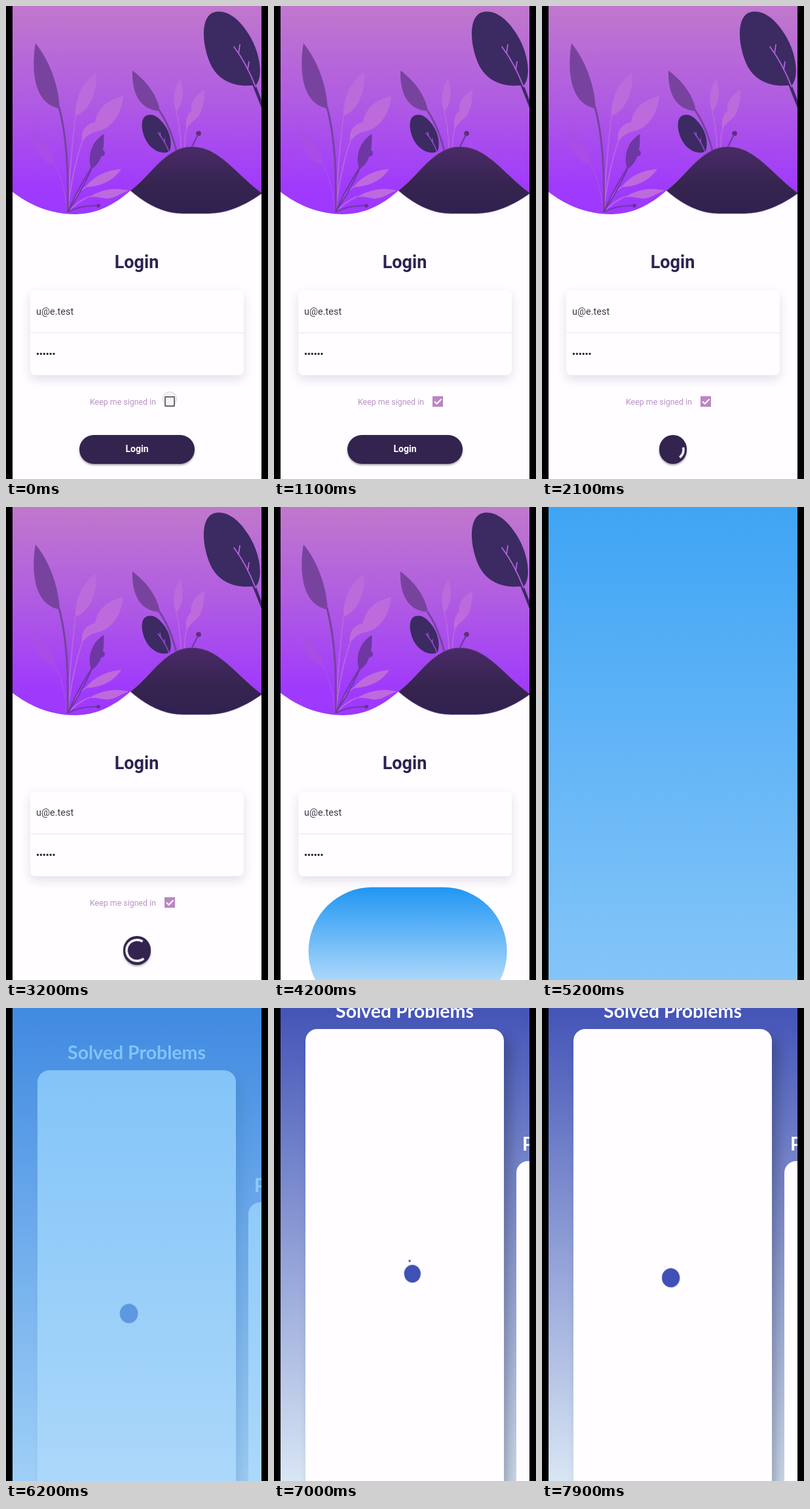
Write an HTML page that moves like this. It is 400x720 px and loops after 8000 ms.

```html
<!DOCTYPE html>
<html lang="en">
<head>
<meta charset="utf-8">
<title>Login</title>
<style>
  :root { --loop: 8s; --dark: #33234f; --indigo: #3f51b5; }
  html, body { margin: 0; width: 100%; height: 100%; overflow: hidden; background: #000; }
  body { position: relative; }
  div, span { position: absolute; box-sizing: border-box; white-space: nowrap; }
  .screen { left: 10px; top: 0; width: 380px; height: 720px; overflow: hidden; background: #fffdff; }
  /* children use stage coordinates */
  .stage { left: -10px; top: 0; width: 400px; height: 720px; font-family: Roboto, sans-serif; }
  .stage > svg { position: absolute; left: 0; top: 0; }

  .heading { left: 0; width: 399px; top: 374px; line-height: 32px; text-align: center; font-size: 27px; font-weight: 700; color: #2d2250; }
  .form { left: 37px; top: 433px; width: 326px; height: 129px; border-radius: 8px; background: #fffdff; box-shadow: 0 6px 16px rgba(70, 40, 120, .15); }
  .form::after { content: ""; position: absolute; left: 0; right: 0; top: 64px; height: 1px; background: #e9e5ee; }
  .mail { left: 9px; top: 23px; line-height: 20px; font-size: 14.5px; color: #403a48; }
  .keep { left: 128px; top: 593px; line-height: 19px; font-size: 12.4px; color: #b892c4; }

  .ripple { left: 239px; top: 587px; width: 22px; height: 22px; border-radius: 50%; background: rgba(189, 135, 194, .1); border: 1px solid rgba(130, 110, 150, .22); animation: ripple var(--loop) infinite; }
  .box { left: 242px; top: 594px; width: 16px; height: 16px; border: 2px solid #6f6b72; border-radius: 1px; }
  .tick { left: 242px; top: 594px; width: 16px; height: 16px; border-radius: 1px; background: #bb86c3; animation: check var(--loop) infinite; }
  .tick svg { display: block; }

  .button { left: 200px; top: 652.5px; width: 176px; height: 44px; border-radius: 22px; background: var(--dark); box-shadow: 0 2px 3px rgba(0, 0, 0, .35); transform: translateX(-50%); animation: shrink var(--loop) infinite; }
  .label { left: 100px; width: 200px; top: 664px; line-height: 21px; text-align: center; font-size: 14px; font-weight: 700; color: #fff; animation: label var(--loop) infinite; }
  .loader { left: 179px; top: 653px; width: 42px; height: 44px; animation: loader var(--loop) infinite; }
  .loader svg { display: block; animation: turn var(--loop) linear infinite; }
  .arc { fill: none; stroke: #fff; stroke-width: 3.5; animation: arc calc(var(--loop) / 6) -233ms infinite; }

  .flood { left: 204px; top: 676px; border-radius: 100px; background: linear-gradient(#2196f3, #dff0fd); transform: translate(-50%, -50%); animation: flood var(--loop) infinite; }

  .page { inset: 0; background: linear-gradient(#4454b7, #d8e6f4); animation: fade var(--loop) infinite; }
  .slide { inset: 0; animation: slide var(--loop) infinite; }
  .title { line-height: 36px; font: 700 28.5px/36px Lato, sans-serif; color: #fff; }
  .main { left: 0; width: 399px; top: -14px; text-align: center; }
  .next { left: 379px; top: 188px; }
  .card { width: 303px; height: 900px; border-radius: 18px; background: #fffdff; box-shadow: 10px 12px 18px rgba(30, 35, 60, .32); }
  .dots { left: 175px; top: 372px; width: 50px; height: 50px; transform: scaleX(.94); }
  .spin { inset: 0; animation: spin 2s 72ms linear infinite backwards; animation-delay: -1928ms; }
  .dot { left: 0; width: 30px; height: 30px; border-radius: 50%; background: var(--indigo); }
  .a { top: 0; animation: grow 2s -1928ms infinite; }
  .b { bottom: 0; animation: flip 2s -1928ms ease-in-out infinite; }

  @keyframes ripple {
    0% { transform: none; opacity: 1; }
    4% { transform: translateY(4px) scale(1.7); opacity: 1; }
    9%, 100% { transform: translateY(4px) scale(1.8); opacity: 0; }
  }
  @keyframes check { 0%, 1% { opacity: 0; } 3.5%, 100% { opacity: 1; } }
  @keyframes shrink {
    0%, 15.6% { width: 176px; animation-timing-function: cubic-bezier(.4, 0, .2, 1); }
    20%, 100% { width: 42px; }
  }
  @keyframes label { 0%, 15.6% { opacity: 1; } 17.5%, 100% { opacity: 0; } }
  @keyframes loader { 0%, 18.5% { opacity: 0; } 20%, 44.5% { opacity: 1; } 45.5%, 100% { opacity: 0; } }
  @keyframes turn { from { transform: rotate(-342.5deg); } to { transform: rotate(1493.5deg); } }
  @keyframes arc {
    0% { stroke-dasharray: 0 360; stroke-dashoffset: 0; animation-timing-function: cubic-bezier(.4, 0, .2, 1); }
    50% { stroke-dasharray: 270 360; stroke-dashoffset: 0; animation-timing-function: cubic-bezier(.4, 0, .2, 1); }
    100% { stroke-dasharray: 0 360; stroke-dashoffset: -270; }
  }
  @keyframes flood {
    0%, 49.49% { width: 42px; height: 44px; visibility: hidden; }
    49.5% { width: 42px; height: 44px; visibility: visible; animation-timing-function: ease-in-out; }
    65%, 100% { width: 3428px; height: 2000px; visibility: visible; }
  }
  @keyframes fade {
    0%, 75.94% { opacity: 0; animation-timing-function: cubic-bezier(.42, .2, 1, 1); }
    79.69%, 100% { opacity: 1; }
  }
  @keyframes slide {
    0%, 75.94% { transform: translateY(180px); animation-timing-function: cubic-bezier(.4, 0, .2, 1); }
    79.69%, 100% { transform: none; }
  }
  @keyframes spin { to { transform: rotate(360deg); } }
  @keyframes flip { from { transform: scale(-1); } to { transform: scale(1); } }
  /* the two halves of ease-in-out */
  @keyframes grow {
    0% { transform: scale(0); animation-timing-function: cubic-bezier(.42, 0, .63, .5); }
    50% { transform: scale(1); animation-timing-function: cubic-bezier(.37, .5, .58, 1); }
    100% { transform: scale(0); }
  }
</style>
</head>
<body>
<div class="screen"><div class="stage">
  <svg width="400" height="330" viewBox="0 0 400 330">
    <defs>
      <linearGradient id="sky" x2="0" y2="1"><stop stop-color="#c078cc"/><stop offset=".45" stop-color="#b05ce2"/><stop offset=".87" stop-color="#a03afc"/><stop offset="1" stop-color="#9d38ff"/></linearGradient>
      <linearGradient id="hill" x2="0" y2="1"><stop stop-color="#4a2a68"/><stop offset=".6" stop-color="#35244f"/><stop offset="1" stop-color="#2f2150"/></linearGradient>
    </defs>
    <path fill="url(#sky)" d="M10 0H390V286L190 281C165 303 138 317 105 317C65 317 32 300 10 283Z"/>
    <g fill="#bd6add" stroke="#b763e2" stroke-width="0">
      <path fill="#a950e3" opacity=".65" d="M39 184C40 215 50 237 75 242C73 222 58 200 39 184Z"/>
      <path d="M137 101C117 116 105 140 106 167C128 160 141 128 137 101Z"/>
      <path d="M179 137C156 142 139 156 136 177C122 179 114 190 116 207C130 187 142 194 155 184C169 174 177 157 179 137Z"/>
      <path d="M176 248C152 250 133 260 121 276C147 274 164 266 176 248Z"/>
      <path d="M188 281C168 276 148 278 126 291C140 289 144 293 156 293C168 292 176 284 188 281Z"/>
      <path d="M266 110C255 125 254 146 260 161C270 150 273 128 266 110Z"/>
      <path d="M303 128C286 137 281 150 283 160C275 165 273 178 276 188C282 174 292 174 298 160C302 150 303 140 303 128Z"/>
      <g fill="none" stroke-width="2">
        <path stroke="#a950e3" opacity=".7" d="M75 242Q90 270 93 313"/>
        <path d="M106 167Q98 235 94 313M117 204Q101 250 94 313M122 275Q104 287 94 314M127 290Q108 298 94 314M260 160Q266 185 267 216M276 186Q272 202 273 216"/>
      </g>
    </g>
    <g fill="#78439f">
      <path d="M45 57C39 92 40 149 82 156C80 120 66 82 45 57Z"/>
      <path fill="#6e37a4" d="M149 195C133 205 123 225 130 248C146 241 151 215 149 195Z"/>
      <path d="M193 98C192 128 201 158 235 160C231 135 213 113 193 98Z"/>
      <circle fill="#6e37a4" cx="146" cy="224" r="5"/>
      <circle fill="#65308f" cx="141" cy="304" r="2.8"/>
      <circle fill="#583178" cx="294" cy="194" r="3.8"/>
      <g fill="none" stroke="#78439f" stroke-width="3">
        <path d="M81 154Q97 215 94 314M234 159Q251 184 260 220"/>
        <path stroke="#6e37a4" stroke-width="2" d="M149 197Q133 255 94 314M144 226Q113 270 94 314M139 304Q113 303 94 314M293 196L283 216"/>
      </g>
    </g>
    <g fill="#3c2a62">
      <path d="M320 9C298 12 297 54 312 88C325 116 353 125 382 120C393 106 388 70 370 42C354 17 336 6 320 9Z"/>
      <path d="M375 117L380 117L390 143V155Z"/>
      <path d="M217 166C204 168 206 190 214 205C223 221 240 227 250 221C255 205 248 187 238 176C231 168 224 164 217 166Z"/>
      <path fill="url(#hill)" stroke="#8d62b0" stroke-width=".6" d="M190 281C222 257 244 214 284 214C326 214 352 257 391 285C361 306 336 316 305 316H270C238 316 211 299 190 281Z"/>
    </g>
    <g fill="none" stroke="#b062dc" stroke-width="1.8" stroke-linecap="round">
      <path d="M348 62Q367 87 381 123M355 72L357 59M369 97L371 85"/>
      <path stroke="#9b50d4" stroke-width="1.3" d="M232 193Q243 206 249 222M236 198L235 192M242 208V202"/>
    </g>
  </svg>

  <div class="heading">Login</div>
  <div class="form">
    <span class="mail">u@e.test</span>
    <svg width="40" height="129"><path d="M11.5 96.5H37" stroke="#2b2733" stroke-width="3.4" stroke-linecap="round" stroke-dasharray="0 4.9"/></svg>
  </div>
  <span class="keep">Keep me signed in</span>
  <div class="ripple"></div>
  <div class="box"></div>
  <div class="tick"><svg width="16" height="16"><path d="M3 8L6.5 11.5L13.5 4.5" fill="none" stroke="#fff" stroke-width="2"/></svg></div>

  <div class="button"></div>
  <div class="label">Login</div>
  <div class="loader"><svg width="42" height="44"><circle class="arc" cx="21" cy="22" r="16" pathLength="360"/></svg></div>
  <div class="flood"></div>

  <div class="page"><div class="slide">
    <div class="card" style="left:48px;top:32px"></div>
    <div class="title main">Solved Problems</div>
    <div class="card" style="left:370px;top:233px"></div>
    <div class="title next">P</div>
    <div class="dots"><div class="spin"><div class="dot a"></div><div class="dot b"></div></div></div>
  </div></div>
</div></div>
</body>
</html>
```
